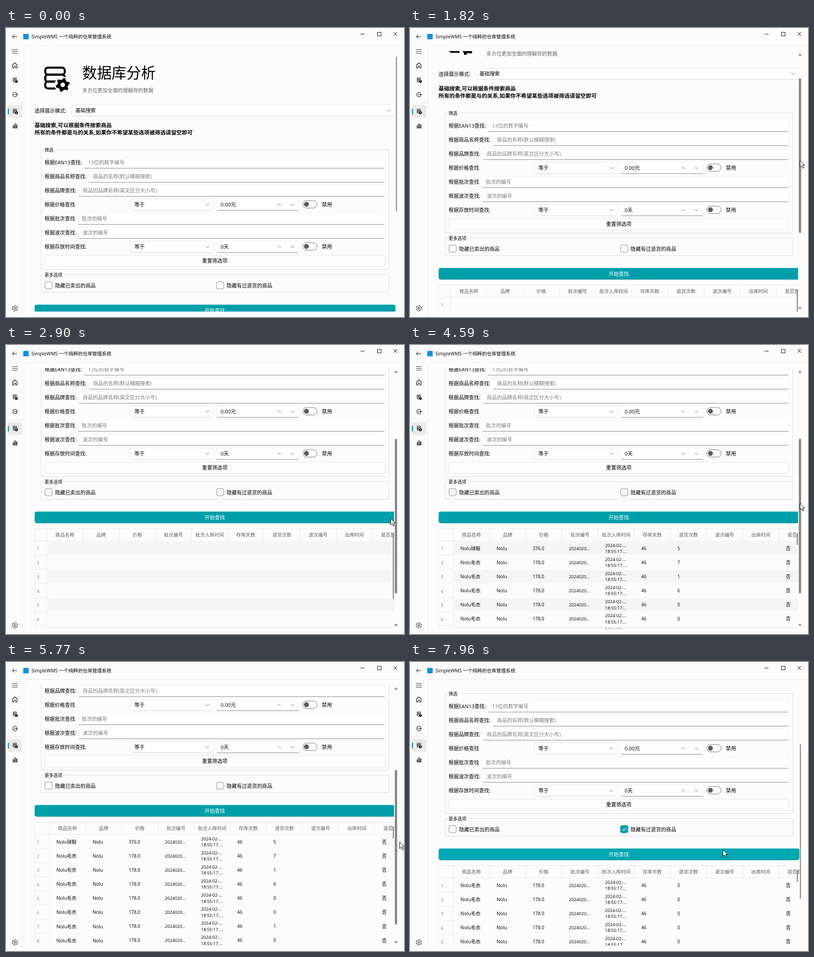
Animation of 877x638 px, one loop 8000 ms. Source, as an HTML page:

```html
<!DOCTYPE html>
<html lang="zh-CN">
<head>
<meta charset="utf-8">
<title>SimpleWMS</title>
<style>
html, body { margin: 0; width: 100%; height: 100%; overflow: hidden; background: #fcfcfc; }
svg { display: block; width: 877px; height: 638px; }
text { font-family: 'Open Sans', 'Noto Sans CJK SC', 'Noto Sans CJK', sans-serif; white-space: pre; }
</style>
</head>
<body>
<svg id="stage" viewBox="0 0 877 638" fill="none"></svg>
<script>
const LOOP = 8000;
const TEAL = '#009faa', TEAL_LIGHT = '#00a7b3', INK = '#000', GREY = '#858585', EDGE = '#e4e4e4';

// Drawing helpers
const text = (x, cy, s, size = 11.2, fill = INK, extra = '') =>
  `<text x="${x}" y="${(cy + size * 0.38).toFixed(2)}" font-size="${size}" fill="${fill}" ${extra}>${s}</text>`;
const mid = (x, cy, s, size, fill) => text(x, cy, s, size, fill, 'text-anchor="middle"');
const rect = (x, y, w, h, r = 0, attrs = '') =>
  `<rect x="${x}" y="${y}" width="${w}" height="${h}" rx="${r}" ${attrs}/>`;
const path = (d, stroke = INK, width = 1, extra = '') =>
  `<path d="${d}" stroke="${stroke}" stroke-width="${width}" ${extra}/>`;
const group = (id, body, attrs = '') => `<g id="${id}" ${attrs}>${body}</g>`;
const chevron = (x, y, dir = 1) =>
  path(`M${x - 4} ${y - 2 * dir}l4 ${4 * dir}l4 ${-4 * dir}`, '#707070');

function gear(cx, cy, outer, inner, hole, attrs) {
  const points = [];
  for (let i = 0; i < 24; i++) {
    const a = (i + 0.5) * Math.PI / 12, r = i % 4 < 2 ? outer : inner;
    points.push(`${(cx + r * Math.sin(a)).toFixed(2)} ${(cy - r * Math.cos(a)).toFixed(2)}`);
  }
  return `<path fill-rule="evenodd" d="M${points.join('L')}ZM${cx - hole} ${cy}a${hole} ${hole} 0 1 0 ${2 * hole} 0a${hole} ${hole} 0 1 0 ${-2 * hole} 0" ${attrs}/>`;
}

function dataIcon(x, y, badge) {
  const body = [0, 3, 6].map(d => rect(x - 4.5, y - 5 + d, 8, 3, 1.4, `stroke="${INK}"`)).join('');
  return body + `<circle cx="${x + 3}" cy="${y + 2.5}" r="3.6" fill="#fcfcfc"/>` + badge;
}

function frameParts() {
  return path('M39.5 638V46.5q0-8 8-8H877', '#ebebeb') +
    path('M24.5 19H14M18.5 14.5L14 19l4.5 4.5') +
    rect(38, 13, 12, 12, 0, 'fill="#1592dc"') +
    text(56, 19, 'SimpleWMS 一个纯粹的仓库管理系统', 10.5) +
    path('M781 13.5h9M818.5 9.5h8v8h-8zM854 9l8 8M862 9l-8 8') +
    path('M13 47.5h13M13 51.5h13M13 55.5h13', '#333') +
    path('M14.5 81.5l5-4.5l5 4.5v7h-3.2v-4.5h-3.6v4.5h-3.2z', INK, 1.1, 'stroke-linejoin="round"') +
    dataIcon(20, 115, `<circle cx="23" cy="118" r="3" fill="${INK}"/>` + path('M23 116v2.3h1.5', '#fff', 0.8)) +
    path('M24 144a5 5 0 1 0 0 6M17.5 147h7.5M22.8 144.8l2.2 2.2l-2.2 2.2', INK, 1.1) +
    path('M0 165.5h39', '#e9e9e9') +
    rect(4, 170, 32, 28.5, 4, 'fill="#eaeaea"') +
    rect(4, 178, 2.5, 13, 1.2, `fill="${TEAL}"`) +
    dataIcon(20, 184, gear(23, 187, 3.8, 2.8, 1.1, `fill="${INK}"`)) +
    path('M15.5 215.5h2v5.5h-2zM18.8 211.5h2.4v9.5h-2.4zM22.5 214h2v7h-2z') +
    gear(19.5, 619, 6.2, 4.8, 2, `stroke="${INK}" stroke-linejoin="round"`);
}

function heading() {
  const tiers = [87.5, 103, 118].map(y => rect(86.5, y, 43, 15.5, 6, 'stroke="#000" stroke-width="4.6"')).join('');
  return tiers +
    '<circle cx="125" cy="125.5" r="18" fill="#fcfcfc"/>' +
    gear(125, 125.5, 15.5, 11.5, 5, 'fill="#000"') +
    text(168, 98.5, '数据库分析', 32.4) +
    text(168, 138, '多方位更加全面的理解你的数据', 11.2, '#666') +
    text(63, 182.5, '选择展示模式:') + combo(144.5, 169.5, 713, '基础搜索', 153) +
    text(63, 214.5, '基础搜索,可以根据条件搜索商品', 11.9, INK, 'font-weight="700"') +
    text(63, 230, '所有的条件都是与的关系,如果你不希望某些选项被筛选请留空即可', 11.9, INK, 'font-weight="700"');
}

function combo(x, y, w, label, tx) {
  return rect(x, y, w, 25, 4, 'fill="#fefefe" stroke="#e8e8e8"') +
    path(`M${x + 3} ${y + 25}h${w - 6}`, '#d4d4d4') +
    text(tx, y + 12.5, label) + chevron(x + w - 13.5, y + 12.5);
}

function field(x, cy, end, body) {
  return rect(x, cy - 12.5, end - x, 25, 4, 'fill="#fefefe" stroke="#f4f4f4"') +
    path(`M${x + 1} ${cy + 12.5}H${end - 1}`, GREY) + body;
}

const input = (cy, label, x, tx, hint) =>
  text(85, cy, label) + field(x, cy, 835, text(tx, cy, hint, 11.2, '#7d7d7d'));

function condition(cy, label, value) {
  return text(85, cy, label) + combo(274.5, cy - 12.5, 183, '等于', 283) +
    field(464, cy, 646, text(473, cy, value) + chevron(602, cy, -1) + chevron(631, cy)) +
    rect(654, cy - 9, 31.5, 16.5, 8.2, 'fill="#fcfcfc" stroke="#707070"') +
    `<circle cx="662" cy="${cy - 0.75}" r="5.4" fill="#5c5c5c"/>` + text(696, cy, '禁用');
}

const frameBox = (y, h, w, title) =>
  path(`M83 ${y}H77.5v${h}H843.5V${y}H${w}`, '#dcdcdc') + text(85, y + 0.5, title, 9.8);

const checkbox = (x, label) =>
  rect(x + 0.5, 560, 16, 16, 4, 'class="box" stroke="#858585"') + text(x + 22.5, 568.5, label);

function form() {
  return frameBox(268.5, 265, 106, '筛选') +
    input(297, '根据EAN13查找:', 171, 181, '13位的数字编号') +
    input(328, '根据商品名称查找:', 182, 191.5, '商品的名称(默认模糊搜索)') +
    input(359, '根据品牌查找:', 160, 169, '商品的品牌名称(英文区分大小写)') +
    condition(390, '根据价格查找', '0.00元') +
    input(421, '根据批次查找', 158, 167, '批次的编号') +
    input(452, '根据波次查找:', 160, 169, '波次的编号') +
    condition(483, '根据存放时间查找:', '0天') +
    rect(85.5, 501.5, 749.5, 25, 4, `id="reset" stroke="${EDGE}"`) + mid(460, 514, '重置筛选项') +
    frameBox(544.5, 39, 126, '更多选项') +
    checkbox(85.5, '隐藏已卖出的商品') + checkbox(463.5, '隐藏有过退货的商品') +
    group('tick', rect(463.5, 559.5, 17, 17, 4, `fill="${TEAL}"`) + path('M468 568l3 3l5.5-5.5', '#fff', 1.2)) +
    rect(63.4, 611.1, 794.4, 24.7, 4, `id="search" stroke="${TEAL_LIGHT}" stroke-width="0.8"`) +
    path('M66 635.9H855', '#007f88', 0.8) + mid(460, 623.5, '开始查找', 11.2, '#fff');
}

// Table
const COL = 79.7, ROW = 31.1, TOP = 648.5, BODY = 676, ROWS = 10;
const HEADS = ['商品名称', '品牌', '价格', '批次编号', '批次入库时间', '存库天数', '退货次数', '波次编号', '出库时间', '是否售出'];
const RETURNS = [5, 7, 1, 6, 0, 0, 1, 0, 0, 0];
const rowY = i => BODY + 16 + i * ROW;

function grid(left) {
  let s = path(`M63.5 960V${TOP}H858M63 ${BODY - 0.5}H858M${left} ${TOP}V960`, '#ebebeb');
  HEADS.forEach((h, i) => {
    const x = left + i * COL;
    if (i) s += path(`M${x} ${TOP}V${BODY}`, '#ebebeb');
    s += mid(x + COL / 2, 662.5, h, 10.5, '#606060');
  });
  let stripes = '';
  for (let i = 0; i < ROWS; i++) {
    if (i % 2 === 0) stripes += rect(left + 3, rowY(i) - 14, 770, 28, 4, 'fill="#f5f5f5"');
    s += text(68, rowY(i) + 0.5, i + 1, 9.8, '#777') +
      path(`M63 ${rowY(i) + 15}H${left}`, '#ebebeb');
  }
  return `<g class="stripes">${stripes}</g>` + s;
}

function records(filtered) {
  let s = grid(95.5);
  for (let i = 0; i < ROWS; i++) {
    const shoes = !filtered && i === 0, y = rowY(i);
    const put = (c, v, dy = 0, size = 9.9) => text(111 + c * COL, y + dy, v, size);
    s += put(0, 'Nolu' + (shoes ? '球鞋' : '毛衣'), 0, 10.5) + put(1, 'Nolu', 0, 10.4) +
      put(2, shoes ? '376.0' : '178.0') + put(3, '2024020...', 0, 9.6) +
      put(4, '2024-02-...', -7, 9.6) + put(4, '18:55:17....', 6.5, 9.6) +
      put(5, '46') + put(6, filtered ? 0 : RETURNS[i]) + put(9, '否', 0, 10.5);
  }
  return s;
}

const tables =
  group('blank', grid(90)) + group('loaded', records(false)) + group('filtered', records(true)) +
  rect(852.3, 658, 2.4, 146, 1.2, `id="tableBar" fill="${GREY}"`);

const pageBar =
  group('wide', rect(855, 51, 14, 575, 0, 'fill="#fcfcfc"') +
    '<path d="M855.5 61l3.8-5l3.8 5zM855.5 616.5l3.8 5l3.8-5z" fill="#858585"/>') +
  rect(859, 63, 2, 341.5, 1, `id="handle" fill="${GREY}"`);

const pointer = group('cursor',
  '<path d="M0 0V14.5L3.4 11.3L5.8 17L8.3 16L5.9 10.5H10.5Z" fill="#fff" stroke="#000"/>');

document.getElementById('stage').innerHTML =
  '<defs><clipPath id="view"><rect x="40" y="51" width="837" height="575"/></clipPath>' +
  `<clipPath id="sheet"><rect x="63" y="${TOP - 1}" width="795" height="310"/></clipPath></defs>` +
  frameParts() +
  `<g clip-path="url(#view)">${group('page', heading() + form() + `<g clip-path="url(#sheet)">${tables}</g>`)}${pageBar}</g>` +
  pointer;

// Motion: [time, value, ...]
const SCROLL = [[0, 0], [1300, 0], [1780, 81], [1820, 81], [2500, 243], [4650, 243], [5080, 325],
  [5340, 325], [5770, 295], [6090, 209], [6190, 209], [6260, 199], [LOOP, 199]];
const POINTER = [[140, 570, 634], [400, 640, 560], [940, 835, 221], [1150, 858, 238], [1300, 859, 244],
  [1780, 859, 292], [1820, 859, 292], [2500, 865, 388], [2640, 863, 388], [2900, 847, 382],
  [3470, 690, 382], [3650, 690, 382], [4350, 859, 349], [4590, 859, 349], [4650, 861, 366],
  [5080, 868, 415], [5340, 868, 415], [5770, 867, 397], [6090, 861, 346], [6190, 861, 346],
  [6260, 859, 340], [6750, 474, 369], [6940, 474, 371], [7070, 474, 371], [7490, 689, 414], [LOOP, 689, 414]];

function sample(keys, t) {
  let i = 1;
  while (i < keys.length - 1 && keys[i][0] < t) i++;
  const a = keys[i - 1], b = keys[i];
  const k = Math.min(1, Math.max(0, (t - a[0]) / (b[0] - a[0])));
  return a.slice(1).map((v, n) => v + (b[n + 1] - v) * k);
}

const $ = id => document.getElementById(id);
const show = (el, on) => { el.style.display = on ? '' : 'none'; };
const within = (t, from, to) => t >= from && t < to;

function draw(t) {
  const scroll = Math.round(sample(SCROLL, t)[0]);
  const [x, y] = sample(POINTER, t).map(Math.round);
  const wide = within(t, 1100, 2950) || within(t, 4410, 6330);
  const settled = within(t, 2620, 4650);
  const pageY = y + scroll;
  const over = (left, top, right, bottom) =>
    t >= 140 && x >= left && x <= right && pageY >= top && pageY <= bottom;

  $('page').setAttribute('transform', `translate(0 ${-scroll})`);
  $('cursor').setAttribute('transform', `translate(${x + 0.5} ${y + 0.5})`);
  show($('cursor'), t >= 140);

  show($('wide'), wide);
  const handle = $('handle');
  handle.setAttribute('x', wide ? 856.8 : 859.2);
  handle.setAttribute('width', wide ? 5 : 2.2);
  handle.setAttribute('rx', wide ? 2.5 : 1.1);
  handle.setAttribute('y', 63 + scroll * 0.593);

  $('reset').setAttribute('fill', over(85, 501, 835, 527) ? '#f6f6f6' : '#fdfdfd');
  $('search').setAttribute('fill', !wide && over(63, 611, 858, 637) ? TEAL_LIGHT : TEAL);
  show($('tick'), t >= 6800);
  show($('blank'), t < 3640);
  show($('loaded'), within(t, 3640, 7700));
  show($('filtered'), t >= 7700);
  $('tableBar').setAttribute('height', t < 3640 ? 146 : 26.5);
  document.querySelectorAll('.stripes').forEach(el => show(el, settled));
  document.querySelectorAll('.box').forEach(el => el.setAttribute('fill', settled ? '#f5f5f5' : '#fcfcfc'));
}

const start = performance.now();
function tick() {
  draw((performance.now() - start) % LOOP);
  requestAnimationFrame(tick);
}
tick();
</script>
</body>
</html>
```
